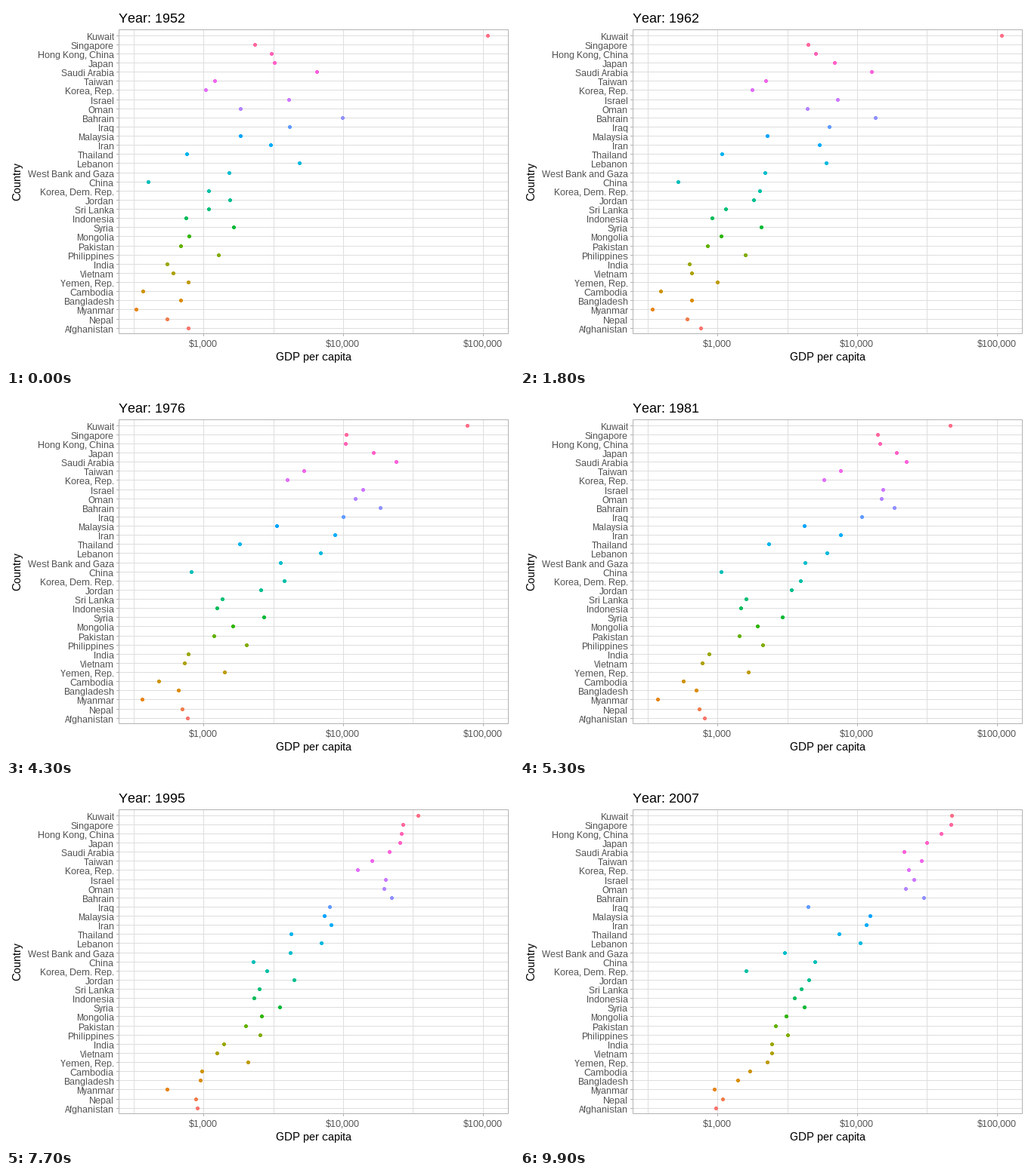
Recreate the animation shown at these times as a matplotlib script. Size 672 by 480 pixels, loop 10000 ms.

```python
import matplotlib.pyplot as plt
import numpy as np
from matplotlib.animation import FuncAnimation
from matplotlib.path import Path

W, H, DPI = 672, 480, 96
PX = 72 / DPI                  # one pixel in points
FRAMES = 100
LEFT, RIGHT, TOP, BOTTOM = 149, 664, 31, 434
GRID, EDGE, LABEL = "#DEDEDE", "#B3B3B3", "#4D4D4D"

plt.rcParams.update({
    "font.family": "Liberation Sans",
    "text.hinting": "native",
    "text.hinting_factor": 1,
    "text.kerning_factor": 6,
})

# Bottom to top: GDP per capita in each key year, growing evenly in between
KEY_YEARS = 1952, 1972, 1987, 2007
COUNTRIES = {
    "Afghanistan": (779, 740, 852, 975),
    "Nepal": (546, 675, 776, 1091),
    "Myanmar": (331, 357, 385, 944),
    "Bangladesh": (684, 630, 752, 1391),
    "Cambodia": (368, 422, 684, 1714),
    "Yemen, Rep.": (782, 1265, 1971, 2281),
    "Vietnam": (605, 700, 821, 2442),
    "India": (547, 724, 977, 2452),
    "Philippines": (1273, 1989, 2190, 3190),
    "Pakistan": (685, 1050, 1705, 2606),
    "Mongolia": (787, 1421, 2338, 3096),
    "Syria": (1643, 2571, 3117, 4185),
    "Indonesia": (750, 1111, 1748, 3541),
    "Sri Lanka": (1084, 1213, 1877, 3970),
    "Jordan": (1547, 2111, 4449, 4519),
    "Korea, Dem. Rep.": (1088, 3702, 4106, 1593),
    "China": (400, 677, 1379, 4959),
    "West Bank and Gaza": (1516, 3133, 5107, 3025),
    "Lebanon": (4835, 7486, 5377, 10461),
    "Thailand": (758, 1524, 2983, 7458),
    "Iran": (3035, 9614, 6643, 11606),
    "Malaysia": (1831, 2849, 5250, 12452),
    "Iraq": (4130, 9576, 11644, 4471),
    "Bahrain": (9867, 18269, 18524, 29796),
    "Oman": (1828, 10618, 18115, 22316),
    "Israel": (4087, 12787, 17122, 25523),
    "Korea, Rep.": (1031, 3031, 8533, 23348),
    "Taiwan": (1207, 4063, 11055, 28718),
    "Saudi Arabia": (6460, 24837, 21198, 21655),
    "Japan": (3217, 14779, 22376, 31656),
    "Hong Kong, China": (3054, 8316, 20038, 39725),
    "Singapore": (2315, 8598, 18862, 47143),
    "Kuwait": (108382, 109348, 28118, 47307),
}
N = len(COUNTRIES)
tracks = np.log10(list(COUNTRIES.values()))


def px(log_gdp):
    return 631.15 + 184.75 * (log_gdp - 5)


def hcl(hue, chroma=100, lum=65):
    """Polar LUV colour to sRGB."""
    h = np.radians(hue)
    y = ((lum + 16) / 116) ** 3
    u = chroma * np.cos(h) / (13 * lum) + 0.19784
    v = chroma * np.sin(h) / (13 * lum) + 0.46834
    x = 9 * y * u / (4 * v)
    z = -x / 3 - 5 * y + 3 * y / v
    rgb = np.clip([
        3.240479 * x - 1.537150 * y - 0.498535 * z,
        -0.969256 * x + 1.875992 * y + 0.041556 * z,
        0.055648 * x - 0.204043 * y + 1.057311 * z,
    ], 0, 1)
    return np.where(rgb > 0.00304, 1.055 * rgb ** (1 / 2.4) - 0.055, 12.92 * rgb)


fig = plt.figure(figsize=(W / DPI, H / DPI), dpi=DPI, facecolor="white")
ax = fig.add_axes([0, 0, 1, 1])
ax.set(xlim=(0, W), ylim=(H, 0))
ax.axis("off")


def text(x, y, s, size, color="black", **kw):
    return ax.text(x, y, s, fontsize=size * PX, color=color, va="baseline", **kw)


def rules(draw_lines, at, start, end, color):
    """Hairlines centred on whole pixels."""
    draw_lines(at + 0.5, start, end, color=color, lw=PX, zorder=1, snap=False)


# Panel, grid and ticks
rows = np.floor(39.15 + 12.127 * np.arange(N - 1, -1, -1))
majors = np.floor(px(np.arange(3, 6)))
minors = np.floor(px(np.arange(2.5, 5)))
rules(ax.hlines, rows, LEFT, RIGHT, GRID)
rules(ax.vlines, np.r_[majors, minors], TOP, BOTTOM, GRID)
rules(ax.hlines, rows, LEFT - 3, LEFT, EDGE)
rules(ax.vlines, majors, BOTTOM + 1, BOTTOM + 4, EDGE)
ax.add_patch(plt.Rectangle((LEFT + 0.5, TOP + 0.5), RIGHT - LEFT, BOTTOM - TOP,
                           fill=False, ec=EDGE, lw=PX, zorder=4, snap=False))

for name, y in zip(COUNTRIES, rows):
    text(142.8, y + 6, name, 12, LABEL, ha="right")
for power, x in zip((3, 4, 5), majors):
    text(x - 0.5, 452, f"${10 ** power:,}", 12, LABEL, ha="center")
text(407, 470, "GDP per capita", 15, ha="center")
text(19, 232, "Country", 15, ha="center", rotation=90, rotation_mode="anchor")
title = text(149, 22, "", 18)

# Five-pixel dot with its corners cut
a, b = 1.5, 2.5
dot = Path([(-a, -b), (a, -b), (a, -a), (b, -a), (b, a), (a, a), (a, b),
            (-a, b), (-a, a), (-b, a), (-b, -a), (-a, -a), (-a, -b)])
dots = ax.scatter(np.zeros(N), rows + 0.5, s=(5 * PX) ** 2, marker=dot,
                  c=[hcl(15 + 360 * k / N) for k in range(N)],
                  linewidths=0, zorder=3, snap=False)


def draw(i):
    year = 1952 + 55 * i / (FRAMES - 1)
    x = px(np.array([np.interp(year, KEY_YEARS, track) for track in tracks]))
    dots.set_offsets(np.c_[np.floor(x) + 0.5, rows + 0.5])
    title.set_text(f"Year: {round(year)}")
    return dots, title


anim = FuncAnimation(fig, draw, frames=FRAMES, interval=100, repeat=True,
                     repeat_delay=0, blit=False)
plt.show()
```
